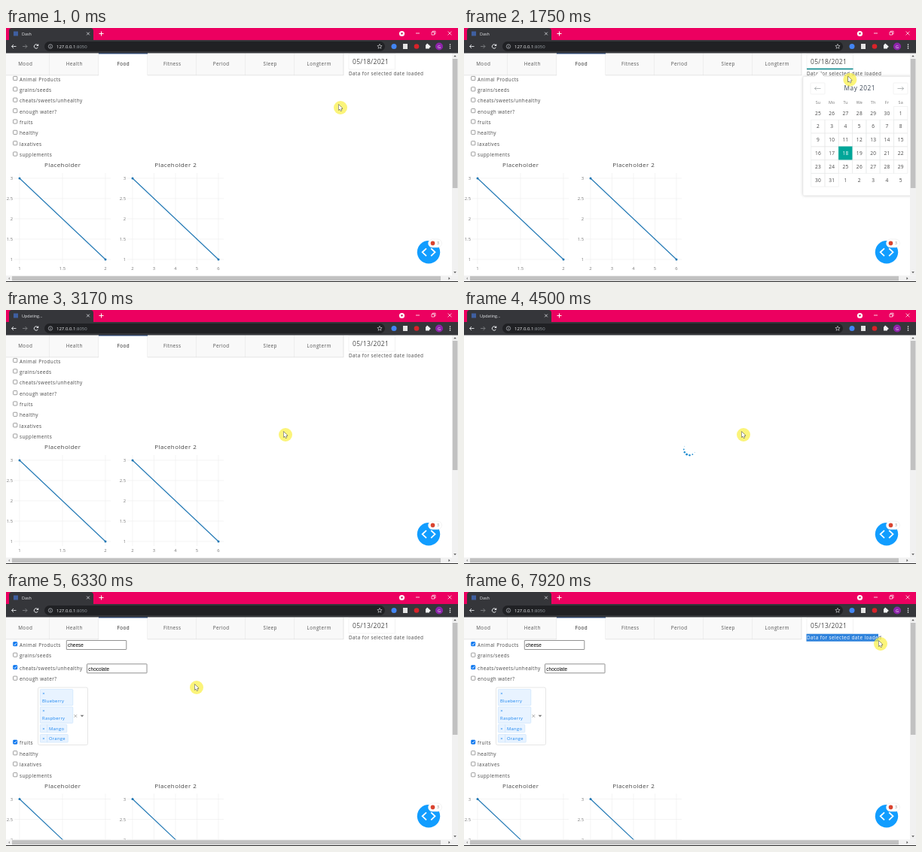
Animation, 600 px wide and 338 px high, one loop 8 s. Source, as an HTML page with a canvas:

```html
<!DOCTYPE html>
<html lang="en">
<head>
<meta charset="utf-8">
<title>Food log</title>
<style>
html, body { margin: 0; width: 100%; height: 100%; overflow: hidden; background: #fff; }
canvas { display: block; width: 600px; height: 338px; }
</style>
</head>
<body>
<canvas></canvas>
<script>
const canvas = document.querySelector('canvas');
const g = canvas.getContext('2d');
const dpr = window.devicePixelRatio || 1;
canvas.width = 600 * dpr;
canvas.height = 338 * dpr;

const LOOP = 8000;
const OPEN = 600, PICK = 2620, BUSY = 2750, BLANK = 3850, LOADED = 4840, IDLE = 5050, SELECT = 6740;
const SANS = '"Open Sans", sans-serif';
const INK = '#484848', BLUE = '#1f77b4';
const TABS = ['Mood', 'Health', 'Food', 'Fitness', 'Period', 'Sleep', 'Longterm'];
const LABELS = ['Animal Products', 'grains/seeds', 'cheats/sweets/unhealthy', 'enough water?',
  'fruits', 'healthy', 'laxatives', 'supplements'];
const ROWS_AFTER = [70.5, 85, 101.5, 116, 201, 215.5, 230, 244.5];

// Pointer path: time, x, y
const PATH = [
  [0, 444, 106], [130, 444, 106], [520, 505, 48], [920, 505, 47], [1080, 537, 156], [1330, 560, 164],
  [1550, 545, 130], [1720, 515, 70], [1930, 470, 47], [2080, 472, 48], [2380, 547, 161], [2660, 547, 161],
  [3120, 371, 166], [4960, 371, 166], [5440, 84, 131], [5750, 84, 131], [5960, 62, 182], [6080, 80, 176],
  [6330, 253, 127], [6620, 442, 62], [6740, 457, 58], [7380, 543, 60], [7560, 552, 67], [7920, 553, 69], [8000, 553, 69]
];

function pointerAt(t) {
  const i = Math.max(1, PATH.findIndex(p => p[0] >= t));
  const [t0, x0, y0] = PATH[i - 1], [t1, x1, y1] = PATH[i];
  const u = (t - t0) / (t1 - t0), k = u * u * (3 - 2 * u);
  return { x: x0 + (x1 - x0) * k, y: y0 + (y1 - y0) * k };
}

// y is the middle of the capitals
function text(s, x, y, size = 6.4, color = INK, { align = 'left', spacing = .4, font = SANS } = {}) {
  g.font = `${size}px ${font}`;
  g.letterSpacing = spacing + 'px';
  g.textAlign = align;
  g.fillStyle = color;
  g.fillText(s, x + (align === 'center' ? spacing / 2 : 0), y + size * .36);
}
function rect(x, y, w, h, fill, stroke, r = 0, lw = .5) {
  g.beginPath();
  g.roundRect(x, y, w, h, r);
  if (fill) { g.fillStyle = fill; g.fill(); }
  if (stroke) { g.strokeStyle = stroke; g.lineWidth = lw; g.stroke(); }
}
function disc(x, y, r, fill) {
  g.beginPath();
  g.arc(x, y, r, 0, 7);
  g.fillStyle = fill;
  g.fill();
}
function line(color, lw, ...pts) {
  g.beginPath();
  for (let i = 0; i < pts.length; i += 2) g.lineTo(pts[i], pts[i + 1]);
  g.strokeStyle = color;
  g.lineWidth = lw;
  g.stroke();
}
function poly(fill, ...pts) {
  g.beginPath();
  for (let i = 0; i < pts.length; i += 2) g.lineTo(pts[i], pts[i + 1]);
  g.fillStyle = fill;
  g.fill();
}
function cross(x, y, r, color, lw = .8) {
  line(color, lw, x - r, y - r, x + r, y + r);
  line(color, lw, x - r, y + r, x + r, y - r);
}
function arrow(x, y, dir, color, len = 3, head = 2.5, lw = .9) {
  line(color, lw, x - dir * len, y, x + dir * len, y);
  line(color, lw, x + dir * (len - head), y - head, x + dir * len, y, x + dir * (len - head), y + head);
}

function drawBrowser(title) {
  rect(0, 0, 600, 17, '#ec0060');
  rect(4, 0, 112, 20, '#35363a', null, [4, 4, 0, 0]);
  rect(0, 16, 600, 17.5, '#35363a');
  rect(10, 4.5, 6, 6, '#3f5fa0');
  text(title, 21, 7.8, 5.4, '#e8eaed', { spacing: 0 });
  cross(109, 7.5, 1.9, '#dfe1e5');
  line('#fff', 1, 123.5, 7.5, 129.5, 7.5);
  line('#fff', 1, 126.5, 4.5, 126.5, 10.5);

  disc(525.5, 7.5, 3.6, '#fff');
  poly('#c0004e', 523.7, 6.6, 527.3, 6.6, 525.5, 9);
  line('#fff', .8, 544, 7, 549, 7);
  rect(565, 5.5, 3.6, 3.6, null, '#fff', 0, .7);
  line('#fff', .7, 566.2, 5.3, 566.2, 4.2, 570, 4.2, 570, 8, 568.8, 8);
  cross(589, 7, 2.4, '#fff', .7);

  arrow(10.5, 24.5, -1, '#e8eaed');
  arrow(25, 24.5, 1, '#7d7f83');
  g.beginPath();
  g.arc(40, 24.5, 2.7, .5, 5.6);
  g.strokeStyle = '#e8eaed';
  g.lineWidth = 1;
  g.stroke();
  poly('#e8eaed', 43.2, 21, 43.2, 24, 40.2, 24);

  rect(51, 18, 452, 13, '#202124', null, 6.5);
  g.beginPath();
  g.arc(59, 24.5, 2.7, 0, 7);
  g.strokeStyle = '#bdc1c6';
  g.lineWidth = .7;
  g.stroke();
  line('#bdc1c6', .8, 59, 24.2, 59, 26);
  line('#bdc1c6', .8, 59, 22.7, 59, 23.4);
  text('127.0.0.1', 67, 24.7, 6, '#f1f3f4', { spacing: 0 });
  const hostWidth = g.measureText('127.0.0.1').width;
  text(':8050', 67 + hostWidth, 24.7, 6, '#9aa0a6', { spacing: 0 });

  const star = [];
  for (let i = 0; i <= 10; i++) {
    const r = i % 2 ? 1.4 : 3.3, a = i * Math.PI / 5;
    star.push(496 + r * Math.sin(a), 24.6 - r * Math.cos(a));
  }
  line('#dfe1e5', .6, ...star);
  disc(515, 24.5, 3.5, '#4285f4');
  rect(527, 21, 6, 7, '#e4e4e4');
  disc(545, 24.5, 3.3, '#d8232a');
  rect(557, 22.2, 5, 5.2, '#f1f3f4', null, .5);
  disc(559.3, 22, 1.2, '#f1f3f4');
  disc(562.3, 24.8, 1.2, '#f1f3f4');
  disc(575, 24.5, 5, '#8e24aa');
  text('G', 575, 24.6, 5.4, '#fff', { align: 'center', spacing: 0 });
  for (let i = -1; i < 2; i++) disc(589.5, 24.5 + i * 2.4, .8, '#f1f3f4');
}

function drawScrollbars(thumbEnd) {
  rect(592, 33.5, 8, 296, '#f1f1f1');
  rect(592.8, 41, 6.6, thumbEnd - 41, '#c1c1c1');
  rect(0, 329.5, 600, 7.5, '#f1f1f1');
  rect(8, 330.3, 569, 6, '#c1c1c1');
  poly('#505050', 594.2, 38.3, 597.8, 38.3, 596, 36.3);
  poly('#505050', 594.2, 324.3, 597.8, 324.3, 596, 326.3);
  poly('#a3a3a3', 5, 331.5, 5, 335.1, 3, 333.3);
  poly('#505050', 587.5, 331.5, 587.5, 335.1, 589.5, 333.3);
  rect(0, 337, 600, 1, '#2c2c2c');
}

function drawTabs() {
  TABS.forEach((name, i) => {
    const x = 58 + (i - 1) * 65, active = name === 'Food';
    rect(x, 33.5, 65, 29.5, active ? '#fff' : '#f9f9f9');
    line('#d6d6d6', .6, x + 65, 33.5, x + 65, 63);
    if (active) rect(x, 33, 65, 1.6, '#2c4f86');
    else line('#d6d6d6', .6, x, 62.8, x + 65, 62.8);
    text(name, x + 32.5, 48, 6.4, active ? '#222' : '#555', { align: 'center' });
  });
}

function drawChecklist(loaded) {
  LABELS.forEach((label, i) => {
    const y = loaded ? ROWS_AFTER[i] : 68.3 + i * 14.37;
    const checked = loaded && i % 2 === 0 && i < 5;
    rect(9.6, y - 3.9, 5.2, 5.2, checked ? '#0b76ef' : '#fff', checked ? '#0b76ef' : '#767676', .8, .7);
    if (checked) line('#fff', .9, 10.7, y - 1.2, 11.8, y, 13.9, y - 2.7);
    text(label, 18, y);
  });
  if (!loaded) return;
  const arial = { spacing: .05, font: '"Liberation Sans", Arial, sans-serif' };
  rect(80.3, 64.5, 79.5, 12, '#fff', '#767676', .5, .8);
  text('cheese', 82, 71, 6.4, '#000', arial);
  rect(107.5, 95.8, 79.5, 12, '#fff', '#767676', .5, .8);
  text('chocolate', 109.3, 102.2, 6.4, '#000', arial);
  drawDropdown();
}

function drawDropdown() {
  const blue = '#1683f0', small = { spacing: .3 };
  rect(42.5, 127, 66, 76.5, '#fff', '#ccc', 2);
  const chip = (label, y, w, tall) => {
    rect(45.3, y, w, tall ? 21.5 : 10.5, '#e8f3ff', '#bfdcfb', 1);
    text('×', 50, y + 5.2, 5.8, blue, { align: 'center', spacing: 0 });
    if (!tall) line('#bfdcfb', .5, 54.6, y, 54.6, y + 10.5);
    text(label, tall ? 48 : 57, y + (tall ? 15.2 : 5.4), 5.8, blue, small);
  };
  chip('Blueberry', 129.5, 43.5, true);
  chip('Raspberry', 153, 43.5, true);
  chip('Mango', 176.3, 35.5);
  chip('Orange', 189.6, 37);
  cross(92.3, 165, 1.8, '#888', .7);
  poly('#777', 98.6, 163.7, 103.4, 163.7, 101, 166.3);
}

function drawChart(title, left, xTicks, dy) {
  const tick = { spacing: 0 };
  const top = 200 + dy, bottom = 308 + dy, span = 114;
  text(title, left + 57, 182.3 + dy, 8, '#2a3f5f' && '#444', { align: 'center' });
  xTicks.forEach((label, i) => {
    const x = left + span * i / (xTicks.length - 1);
    line('#ececec', .6, x, top - 7, x, bottom + 6);
    text(label, x, 320.3 + dy, 5.9, '#777', { ...tick, align: 'center' });
  });
  for (let i = 0; i < 5; i++) {
    const y = bottom - 27 * i;
    line('#ececec', .6, left - 7, y, left + span + 7, y);
    text(String(1 + i / 2), left - 9, y, 5.9, '#777', { ...tick, align: 'right' });
  }
  line(BLUE, 1.1, left, top, left + span, bottom);
  disc(left, top, 1.5, BLUE);
  disc(left + span, bottom, 1.5, BLUE);
}

function drawDate(date, focused, selectedTo) {
  const message = 'Data for selected date loaded';
  rect(455, 34, 61.5, 21, '#fff', '#e4e4e4');
  text(date, 460, 44.8, 8.5, INK, { spacing: .3 });
  if (focused) rect(455, 53.8, 61.5, 1.4, '#008489');
  text(message, 455, 60.5);
  if (selectedTo <= 455) return;
  g.save();
  g.beginPath();
  g.rect(454.5, 55.8, selectedTo - 454.5, 10);
  g.clip();
  rect(454, 55, 120, 12, '#2f83dc');
  text(message, 455, 60.5, 6.4, '#fff');
  g.restore();
}

function drawCalendar(pointer) {
  const cellW = 18.3, cellH = 17.8, x0 = 460.7, y0 = 104.4;
  const center = { align: 'center', spacing: .3 };
  g.save();
  g.shadowColor = 'rgba(0,0,0,.2)';
  g.shadowBlur = 4 * dpr;
  rect(450, 64.5, 150, 158.5, '#fff', null, 1.5);
  g.restore();
  rect(450, 64.5, 150, 158.5, null, '#e2e2e2', 1.5);
  poly('#fff', 465.5, 65, 472, 57, 478.5, 65);
  line('#ddd', .4, 465.5, 64.5, 472, 57, 478.5, 64.5);

  text('May 2021', 525, 80.3, 8.3, '#3c4858', { align: 'center', spacing: .5 });
  [[469.5, -1], [579.5, 1]].forEach(([x, dir]) => {
    rect(x - 9.5, 73, 19, 15, '#fff', '#e4e7e7', 1);
    arrow(x, 80.5, dir, '#82888a', 4, 2.2, .6);
  });
  ['Su', 'Mo', 'Tu', 'We', 'Th', 'Fr', 'Sa'].forEach((d, i) =>
    text(d, x0 + cellW * (i + .5), 98.8, 5.4, '#757575', { align: 'center', spacing: .1 }));

  const hoverCol = Math.floor((pointer.x - 1.5 - x0) / cellW);
  const hoverRow = Math.floor((pointer.y - 4.5 - y0) / cellH);
  for (let i = 0; i < 42; i++) {
    const col = i % 7, row = (i - col) / 7, x = x0 + col * cellW, y = y0 + row * cellH;
    const day = i < 6 ? 25 + i : i < 37 ? i - 5 : i - 36;
    const inMonth = i > 5 && i < 37, chosen = inMonth && day === 18;
    const hovered = inMonth && col === hoverCol && row === hoverRow;
    if (inMonth) {
      rect(x, y, cellW, cellH, chosen ? '#00a699' : hovered ? '#dfe2e2' : null, chosen ? '#00a699' : '#e4e7e7');
    }
    text(day, x + cellW / 2, y + cellH / 2, 6.6, chosen ? '#fff' : INK, center);
  }
}

// Twelve dots pulse in turn around a ring
function drawSpinner(t) {
  const ease = u => u * u * (3 - 2 * u);
  for (let i = 0; i < 12; i++) {
    const phase = (((t - 4500) / 1000 + 1.08 - i * .1 + .1) % 1.2 + 1.2) % 1.2 / 1.2;
    const scale = phase < .4 ? ease(phase / .4) : phase < .8 ? ease(2 - phase / .4) : 0;
    const a = i * Math.PI / 6;
    disc(299.5 + 7.7 * Math.sin(a), 185.5 - 7.7 * Math.cos(a), 1.4 * scale, '#1f8dd0');
  }
}

function drawDebugButton() {
  disc(561, 298.3, 15.2, '#119dff');
  line('#fff', 1.8, 558, 293.3, 552.7, 298.3, 558, 303.3);
  line('#fff', 1.8, 564.2, 293.3, 569.5, 298.3, 564.2, 303.3);
  rect(560.5, 281, 18, 11, '#fff', '#e6e6e6', 5.5);
  disc(566.5, 286.4, 2.8, '#d9432f');
  text('3', 573.5, 286.5, 5.2, '#888', { align: 'center', spacing: 0 });
}

function drawPointer({ x, y }, hand) {
  disc(x, y, 9, 'rgba(250,240,70,.72)');
  g.save();
  g.lineJoin = 'round';
  g.translate(x, y);
  g.beginPath();
  if (hand) {
    g.roundRect(-2.3, -5, 1.9, 7, .9);
    g.roundRect(-2.3, -1.2, 5.8, 5.6, 1.4);
    g.moveTo(-2.3, .3);
    g.lineTo(-4, .3);
    g.lineTo(-1.5, 4);
  } else {
    [[-2.5, -4.2], [-2.5, 3.2], [-.8, 1.7], [.4, 4.3], [1.6, 3.8], [.5, 1.2], [2.7, 1.1]].forEach(p => g.lineTo(...p));
    g.closePath();
  }
  g.strokeStyle = '#222';
  g.lineWidth = hand ? 1.2 : .9;
  g.stroke();
  g.fillStyle = '#fff';
  g.fill();
  g.restore();
}

function draw(t) {
  const pointer = pointerAt(t);
  const calendarOpen = t >= OPEN && t < PICK;
  const blank = t >= BLANK && t < LOADED, loaded = t >= LOADED;
  g.setTransform(dpr, 0, 0, dpr, 0, 0);
  rect(0, 0, 600, 338, '#fff');
  if (blank) drawSpinner(t);
  else {
    const dy = loaded ? 75.5 : 0;
    drawChecklist(loaded);
    drawChart('Placeholder', 18, ['1', '1.5', '2'], dy);
    drawChart('Placeholder 2', 168, ['2', '3', '4', '5', '6'], dy);
    drawTabs();
    drawDate(t < PICK ? '05/18/2021' : '05/13/2021', calendarOpen, t >= SELECT ? pointer.x - 3 : 0);
    if (calendarOpen) drawCalendar(pointer);
  }
  drawDebugButton();
  drawScrollbars(loaded ? 190 : 213);
  drawBrowser(t >= BUSY && t < IDLE ? 'Updating...' : 'Dash');
  drawPointer(pointer, calendarOpen && pointer.y > 75);
}

const start = performance.now();
function tick() {
  draw((performance.now() - start) % LOOP);
  requestAnimationFrame(tick);
}
tick();
</script>
</body>
</html>
```
